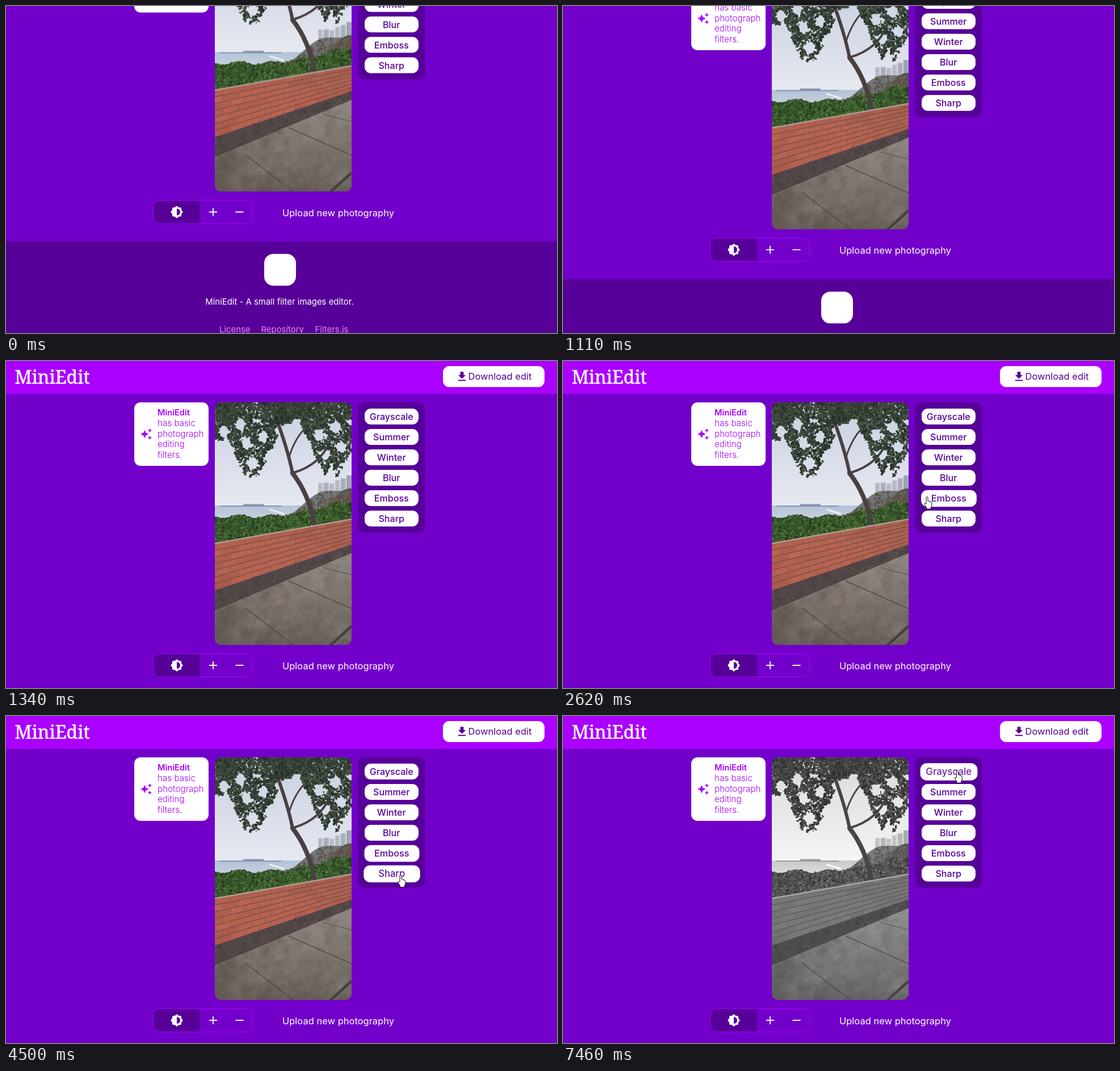
An HTML page with a canvas for the animation above (8 s loop, 971 by 577 pixels).

```html
<!DOCTYPE html>
<html lang="en">
<head>
<meta charset="utf-8">
<title>MiniEdit</title>
<style>
  html, body { margin: 0; width: 100%; height: 100%; overflow: hidden; background: #7200ca; }
  #stage { position: relative; width: 971px; height: 577px; overflow: hidden; background: #7200ca;
    font: 400 16.5px/20px Inter, sans-serif; color: #fff; }
  #stage * { position: absolute; box-sizing: border-box; white-space: nowrap; }
  #page { left: 0; top: 0; width: 971px; height: 751px; }
  header { left: 0; top: 0; width: 971px; height: 57.5px; background: #aa00ff; }
  h1 { margin: 0; left: 15.5px; top: 8px; font: 500 32px/40px "Noto Serif", serif;
    -webkit-text-stroke: .6px #fff; }
  .white { background: #fff; border-radius: 11px; }
  #download { left: 769.5px; top: 8.5px; width: 179.5px; height: 37px; color: #570099; }
  #download span { left: 45px; top: 8px; }
  #card { left: 226px; top: 72.5px; width: 131px; height: 112px; color: #aa00ff;
    font-size: 15.2px; font-weight: 300; line-height: 18.75px; }
  #card p { margin: 0; left: 41px; top: 9.5px; }
  #card b { position: static; font-weight: 600; font-size: 14.6px; }
  #photo { left: 368px; top: 72.5px; border-radius: 11px; }
  #panel { left: 620px; top: 72.5px; width: 118px; height: 230.5px; border-radius: 11px; background: #570099; }
  .filter { left: 631.5px; width: 95.5px; height: 28.5px; text-align: center;
    font-size: 16.1px; font-weight: 500; line-height: 28.5px; color: #570099; }
  #tools { left: 259px; top: 515.5px; width: 176px; height: 42.5px; border-radius: 12px;
    border: 1px solid #aa00ff; overflow: hidden; }
  #tools i { left: 0; top: 0; width: 82px; height: 42px; background: #570099; }
  #upload { left: 435px; width: 301px; top: 527.5px; text-align: center; }
  footer { left: 0; top: 588.5px; width: 971px; height: 170px; background: #570099; font-size: 14.9px; }
  #mark { left: 455px; top: 22px; width: 56px; height: 56px; border-radius: 16px; }
  #about { left: 282px; width: 400px; top: 96.5px; text-align: center; }
  footer a { top: 145px; color: #ea80fc; }
  svg { overflow: visible; }
  #cursor { left: 0; top: 0; width: 14px; height: 22px; }
</style>
</head>
<body>
<div id="stage">
  <div id="page">
    <header>
      <h1>MiniEdit</h1>
      <div id="download" class="white">
        <svg style="left:22px;top:7px" width="23" height="23" viewBox="0 0 24 24" fill="#570099"><path d="M5 18h14v2H5zM9 3h6v6h4l-7 7-7-7h4z"/></svg>
        <span>Download edit</span>
      </div>
    </header>
    <div id="card" class="white">
      <svg style="left:10px;top:45.5px" width="22" height="22" viewBox="0 0 24 24" fill="#aa00ff">
        <path id="star" transform="translate(9 12)" d="M0-8 2.5-2.5 8 0 2.5 2.5 0 8-2.5 2.5-8 0-2.5-2.5z"/>
        <use href="#star" transform="translate(14.5 -1) scale(.5)"/>
        <use href="#star" transform="translate(14.5 13) scale(.5)"/>
      </svg>
      <p><b>MiniEdit</b><br>has basic<br>photograph<br>editing<br>filters.</p>
    </div>
    <canvas id="photo" width="241" height="428"></canvas>
    <div id="panel"></div>
    <div id="tools">
      <i></i>
      <svg style="left:41px;top:20.5px" width="1" height="1" fill="#fff">
        <rect x="-8" y="-8" width="16" height="16" rx="2"/>
        <rect x="-8" y="-8" width="16" height="16" rx="2" transform="rotate(45)"/>
        <path d="M0 6V-6A6 6 0 0 1 0 6z" fill="#570099"/>
      </svg>
      <svg style="left:98px;top:13.5px" width="62" height="14" fill="none" stroke="#fff" stroke-width="1.8"><path d="M0 7h14M7 0v14M46.5 7h14"/></svg>
    </div>
    <div id="upload">Upload new photography</div>
    <footer>
      <div id="mark" class="white"></div>
      <div id="about">MiniEdit - A small filter images editor.</div>
      <a style="left:376px">License</a>
      <a style="left:449.5px">Repository</a>
      <a style="left:544.5px">Filters.js</a>
    </footer>
  </div>
  <svg id="cursor" viewBox="0 0 14 22" fill="#fff" stroke="#111" stroke-linejoin="round"><path/></svg>
</div>
<script>
const LOOP = 8000, FADE = 160, PRESS = 5870, APPLY = 7460;
const HAND = 'M4 13V2a1.5 1.5 0 0 1 3 0V8q2-1 3 1 2-1 2 1 2 0 2 2v4q-2 3-2 6H5Q4 18 1 14 0 11 4 13z';
const ARROW = 'M.5.5V16l3.600-3 2 5 2.400-1-2-5h5z';
const $ = id => document.getElementById(id);
const page = $('page'), photo = $('photo'), cursor = $('cursor');
const shape = cursor.querySelector('path');
const clamp = v => Math.max(0, Math.min(1, v));
const mix = (a, b, f) => a + (b - a) * f;
const smooth = u => u * u * (3 - 2 * u);

const buttons = ['Grayscale', 'Summer', 'Winter', 'Blur', 'Emboss', 'Sharp'].map((name, i) => {
  const el = document.createElement('div');
  el.className = 'filter white';
  el.textContent = name;
  const top = 83.5 + i * 36.05;
  el.style.top = top + 'px';
  page.append(el);
  return { el, top };
});

// The pointer leaves each stop for the next one after a short rest.
const stops = [
  { leave: 2285, x: 930, y: 474 },
  { reach: 2620, leave: 2640, x: 641, y: 239 },
  { reach: 3060, leave: 3100, x: 694, y: 164 },
  { reach: 3900, leave: 3930, x: 697, y: 95 },
  { reach: 4500, leave: 4740, x: 695, y: 280 },
  { reach: 5600, x: 694.5, y: 96 }
];

function pointer(t) {
  if (t < stops[0].leave) return null;
  const next = stops.findIndex(s => t < s.reach);
  if (next < 0) return stops[stops.length - 1];
  const a = stops[next - 1], b = stops[next];
  const u = clamp((t - a.leave) / (b.reach - a.leave));
  return { x: mix(a.x, b.x, u * u), y: mix(a.y, b.y, smooth(u)) };
}

function hovered(t) {
  const p = pointer(t);
  if (!p || p.x < 631.5 || p.x > 727) return -1;
  return buttons.findIndex(b => p.y >= b.top && p.y <= b.top + 28.5);
}

function scrollTop(t) {
  const u = clamp((t - 985) / 355);
  return 173.5 * (1 - u - u ** 3 * (1 - u));
}

function paintPhoto() {
  const g = photo.getContext('2d'), W = 241, H = 428;
  let seed = 11;
  const rnd = () => (seed = seed * 16807 % 2147483647) / 2147483647;
  const pick = list => list[Math.floor(rnd() * list.length)];
  const fade = (y0, y1, ...colors) => {
    const f = g.createLinearGradient(0, y0, 0, y1);
    colors.forEach((c, i) => f.addColorStop(i / (colors.length - 1), c));
    return f;
  };
  // Fills the strip between two curves of x.
  const band = (fill, top, bottom, from = 0, to = W) => {
    g.beginPath();
    for (let x = from; x <= to; x++) g.lineTo(x, top(x));
    for (let x = to; x >= from; x--) g.lineTo(x, bottom(x));
    g.fillStyle = fill;
    g.fill();
  };
  const curve = (color, width, f, from = 0, to = W) => {
    g.beginPath();
    for (let x = from; x <= to; x++) g.lineTo(x, f(x));
    g.strokeStyle = color;
    g.lineWidth = width;
    g.stroke();
  };
  const blob = (x, y, r, color) => {
    g.fillStyle = color;
    g.beginPath();
    g.ellipse(x, y, r, r * .55, rnd() * Math.PI, 0, 7);
    g.fill();
  };
  const level = y => () => y;
  const slant = (y, slope) => x => y + slope * x;

  const hedgeTop = x => 201 - 27 * smooth(clamp((x - 100) / 160)) + 3 * Math.sin(x * .11);
  const wallTop = slant(249, -.178), wallFoot = slant(332, -.336), ground = slant(366, -.42);
  const wall = f => x => mix(wallTop(x), wallFoot(x), f);

  // Sky, sea and pier
  band(fade(0, 182, '#c9d0de', '#d8dce9', '#e6e9f0'), level(0), level(183));
  band(fade(182, 210, '#b3c2d8', '#cbd3dd'), level(182), level(225));
  curve('#7988a8', 1.5, level(183), 8, 118);
  curve('#8794b4', 3, level(181), 50, 86);
  curve('#eceef0', 3, slant(160, .3), 96, 122);

  // Buildings and hillside
  for (let x = 182; x < W; x += 10) {
    const top = 142 - (x - 182) * .3 + rnd() * 8;
    g.fillStyle = pick(['#b2b6c2', '#c2c5ce', '#a3a8b5']);
    g.fillRect(x, top, 9, 165 - top);
    g.fillStyle = '#8c92a1';
    for (let y = top + 3; y < 158; y += 4) g.fillRect(x + 1, y, 5, 1);
  }
  const cliff = x => 206 - 50 * smooth(clamp((x - 112) / 85));
  band('#74757a', cliff, level(212), 112);
  band('#5c5248', x => 190 - 38 * smooth(clamp((x - 178) / 60)), level(205), 178);
  for (let i = 0; i < 180; i++) {
    const x = mix(125, W, rnd());
    blob(x, mix(cliff(x) + 3, 198, rnd()), 3, pick(['#5d584f', '#6b6964', '#50563c', '#6b5548']));
  }

  // Hedge
  band('#34522a', hedgeTop, wallTop);
  for (let i = 0; i < 1100; i++) {
    const x = rnd() * W, y = mix(hedgeTop(x), wallTop(x), rnd());
    blob(x, y, 1.3 + rnd() * 2, pick(['#486b35', '#304c27', '#557a3d', '#263d20', '#3d602c']));
  }

  // Tree: a limb bends from one point to another
  const limb = (width, x0, y0, bx, by, x1, y1) => {
    g.beginPath();
    g.moveTo(x0, y0);
    g.quadraticCurveTo(bx, by, x1, y1);
    g.strokeStyle = '#4a4042';
    g.lineWidth = width;
    g.stroke();
  };
  g.lineCap = 'round';
  limb(8, 176, 217, 166, 162, 137, 125);
  limb(6, 137, 125, 128, 80, 105, 20);
  limb(4, 139, 124, 186, 110, 202, 70);
  limb(3, 131, 96, 145, 50, 180, 28);
  g.lineCap = 'butt';

  // Foliage hangs in two lobes, broken by gaps of sky
  const droop = x => Math.max(80 + 54 * Math.cos((x - 66) * .0445), x < 16 ? 66 : 36);
  for (let i = 0; i < 4200; i++) {
    const x = rnd() * W, y = droop(x) * rnd() ** 1.25;
    const gap = Math.sin(x * .13 + y * .05) * Math.sin(y * .11 - x * .06);
    if (y > 28 && gap > .3) continue;
    blob(x, y, 1.5 + rnd() * 2.6, pick(['#303a32', '#3d493b', '#273028', '#46533f', '#353d39']));
  }

  // Brick wall: joints close up with distance
  band(fade(205, 335, '#a95d4c', '#b9624f', '#b05c4b'), wallTop, wallFoot);
  const rows = 7;
  for (let r = 0; r < rows; r++) {
    const top = wall(r / rows), foot = wall((r + 1) / rows);
    for (let x = r % 2 ? -13 : 0; x < W;) {
      const next = x + 27 - Math.max(0, x) * .055;
      band(pick(['#c26b5740', '#9a554640', '#b0604d00']), top, foot, Math.round(x), Math.round(next));
      g.fillStyle = '#80645c';
      g.fillRect(x, top(x), 1.3, foot(x) - top(x));
      x = next;
    }
    curve('#765048', 1.4, top);
  }
  curve('#b29d97', 2.5, wallTop);

  // Footing and pavement
  band('#514746', wallFoot, ground);
  band(fade(270, H, '#8c847e', '#7e766f', '#645d56'), ground, level(H));
  for (let i = 0; i < 420; i++) {
    const x = rnd() * W, y = mix(ground(x), H, rnd());
    blob(x, y, 3 + rnd() * 14, x + y < 440 ? '#5a4e4714' : pick(['#a79e9612', '#524b4512']));
  }
  for (let i = 0; i < 120; i++) {
    const x = rnd() * W;
    blob(x, mix(wallFoot(x), ground(x), rnd()), 2 + rnd() * 3, pick(['#6a5d5833', '#3b343444']));
  }
  curve('#4a4340', 1.8, ground);
  curve('#514b46', 1.6, slant(258, .44), 130);
  curve('#514b46', 1.6, slant(322, .765), 53);
  curve('#5c554f', 1.2, slant(245, .245), 190);
  curve('#47423d', 6, slant(617, -.92), 200);
  curve('#827a71', 1.2, slant(621, -.92), 200);
}

function render(t) {
  page.style.transform = `translateY(${-scrollTop(t)}px)`;
  photo.style.filter = t >= APPLY ? 'grayscale(1) brightness(1.05)' : 'none';

  const levels = buttons.map(() => 0), samples = 16;
  for (let k = 0; k < samples; k++) {
    const i = hovered(t - k * FADE / samples);
    if (i >= 0) levels[i] += 1 / samples;
  }
  buttons.forEach(({ el }, i) => {
    const v = levels[i];
    el.style.transform = v ? `scale(${1 + .05 * v})` : 'none';
    el.style.color = `rgb(${87 + 18 * v}, ${34 * v}, ${153 + 12 * v})`;
  });
  buttons[0].el.style.opacity = t < APPLY ? 1 - .24 * clamp((t - PRESS) / 70) : 1;

  const p = pointer(t), over = hovered(t) >= 0;
  cursor.style.display = p ? 'block' : 'none';
  if (!p) return;
  shape.setAttribute('d', over ? HAND : ARROW);
  cursor.style.transform = `translate(${p.x - (over ? 5 : 0)}px, ${p.y}px)`;
}

function tick() {
  render(performance.now() % LOOP);
  requestAnimationFrame(tick);
}
paintPhoto();
tick();
</script>
</body>
</html>
```
